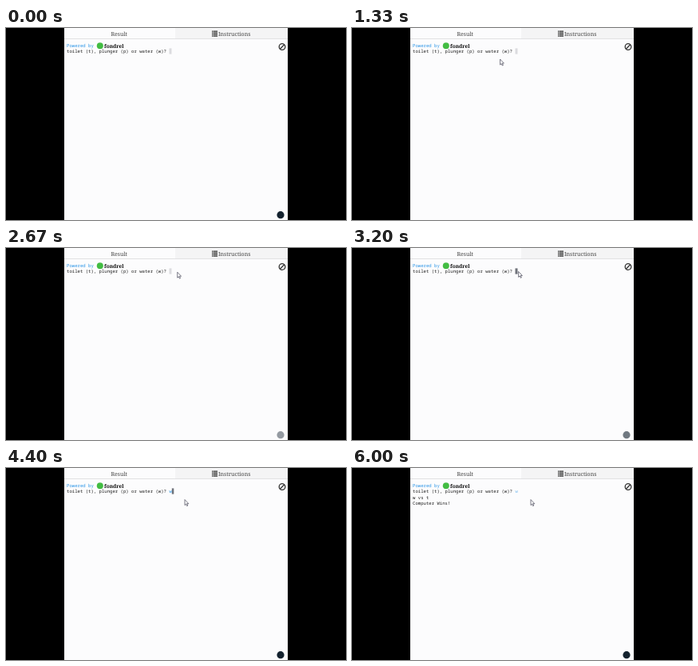
Write an HTML page that moves like this. It is 426 px wide and 240 px high and loops after 6070 ms.

```html
<!DOCTYPE html>
<html lang="en">
<head>
<meta charset="utf-8">
<title>Console game</title>
<style>
html, body { margin: 0; width: 100%; height: 100%; overflow: hidden; background: #000; }
svg { display: block; width: 100vw; height: 100vh; }
text { text-rendering: geometricPrecision; white-space: pre; }
.tab { font: 7px "Noto Serif", serif; fill: #444; }
.brand { font: bold 6.5px "Noto Serif", serif; fill: #111; }
.mono { font: 5.63px "Noto Sans Mono", monospace; fill: #222; }
.blue { fill: #2b95e6; }
</style>
</head>
<body>
<svg viewBox="0 0 426 240">
  <rect width="426" height="240"/>
  <rect x="73" width="280" height="240" fill="#fcfcfd"/>
  <rect x="212" width="141" height="13.5" fill="#f4f4f5"/>
  <path d="M73 13.5H353" stroke="#dcdcde" stroke-width=".8"/>
  <text class="tab" x="131.5" y="9.8">Result</text>
  <g fill="none" stroke="#333">
    <path d="M258 4.2h1.4M258 6.2h1.4M258 8.2h1.4M258 10.2h1.4M259.8 4.2h5.2M259.8 6.2h5.2M259.8 8.2h5.2M259.8 10.2h5.2" stroke-width="1.3"/>
    <circle cx="346" cy="23.5" r="3.8" stroke-width="1.3"/>
    <path d="M348.7 20.8L343.3 26.2" stroke-width="1.3"/>
  </g>
  <text class="tab" x="266" y="9.8">Instructions</text>

  <text class="mono blue" x="76" y="24">Powered by</text>
  <circle cx="117.8" cy="22.2" r="4" fill="#43bd43"/>
  <text class="brand" x="123" y="24.7">fondrel</text>
  <text class="mono" x="76" y="31.2">toilet (t), plunger (p) or water (w)?</text>
  <rect id="caret" y="25.4" height="7.2"/>
  <text id="typed" class="mono blue" x="204.4" y="31.2">w</text>
  <g id="answer">
    <text class="mono" x="76" y="38.6">w vs t</text>
    <text class="mono" x="76" y="46">Computer Wins!</text>
  </g>
  <circle id="badge" cx="344" cy="233.7" r="4.6" fill="#14222e"/>
  <path id="mouse" d="M0 0V7L1.6 5.5L2.7 8L3.8 7.5L2.7 5.1H4.8Z" fill="#fff" stroke="#445" stroke-width=".7" stroke-linejoin="round"/>
</svg>
<script>
const LOOP = 6070, STEP = 200 / 3;
const CLICK = 3000, TYPE = 4200, ENTER = 4730;
const $ = id => document.getElementById(id);
const caret = $('caret'), typed = $('typed'), answer = $('answer');
const badge = $('badge'), mouse = $('mouse');

// rows: time, then values
const path = [
  [700, 168, 70], [1130, 185.6, 39], [1400, 185.6, 39], [2000, 221, 31],
  [2400, 221, 31], [2930, 208.6, 29.4], [3400, 208.6, 29.4], [3800, 224, 39.5]
];
const glow = [
  [0, 1], [1330, 0], [2200, .32], [3200, .6], [4400, 1], [5000, .75], [6000, 1]
];

function sample(rows, t) {
  const i = rows.findIndex(r => r[0] > t);
  if (i < 0) return rows[rows.length - 1].slice(1);
  if (i === 0) return rows[0].slice(1);
  const a = rows[i - 1], b = rows[i];
  const p = (t - a[0]) / (b[0] - a[0]), e = p * p * (3 - 2 * p);
  return a.slice(1).map((v, k) => v + (b[k + 1] - v) * e);
}

function show(el, on) {
  el.setAttribute('visibility', on ? 'visible' : 'hidden');
}

function draw(now) {
  const t = Math.floor((now % LOOP + 5) / STEP) * STEP;
  const focused = t >= CLICK, hasText = t >= TYPE;

  caret.setAttribute('x', hasText ? 207.8 : 204.5);
  caret.setAttribute('width', hasText ? 2.5 : 3);
  caret.setAttribute('fill', focused ? '#70737b' : '#dcdcdf');
  show(caret, t < ENTER);
  show(typed, hasText);
  typed.style.opacity = t < ENTER ? 1 : .6;
  show(answer, t >= ENTER);

  const [x, y] = sample(path, t);
  mouse.setAttribute('transform', `translate(${x} ${y})`);
  show(mouse, t >= 700);
  badge.setAttribute('opacity', sample(glow, t)[0]);
}

const start = performance.now();
function tick() {
  draw(performance.now() - start);
  requestAnimationFrame(tick);
}
tick();
</script>
</body>
</html>
```
